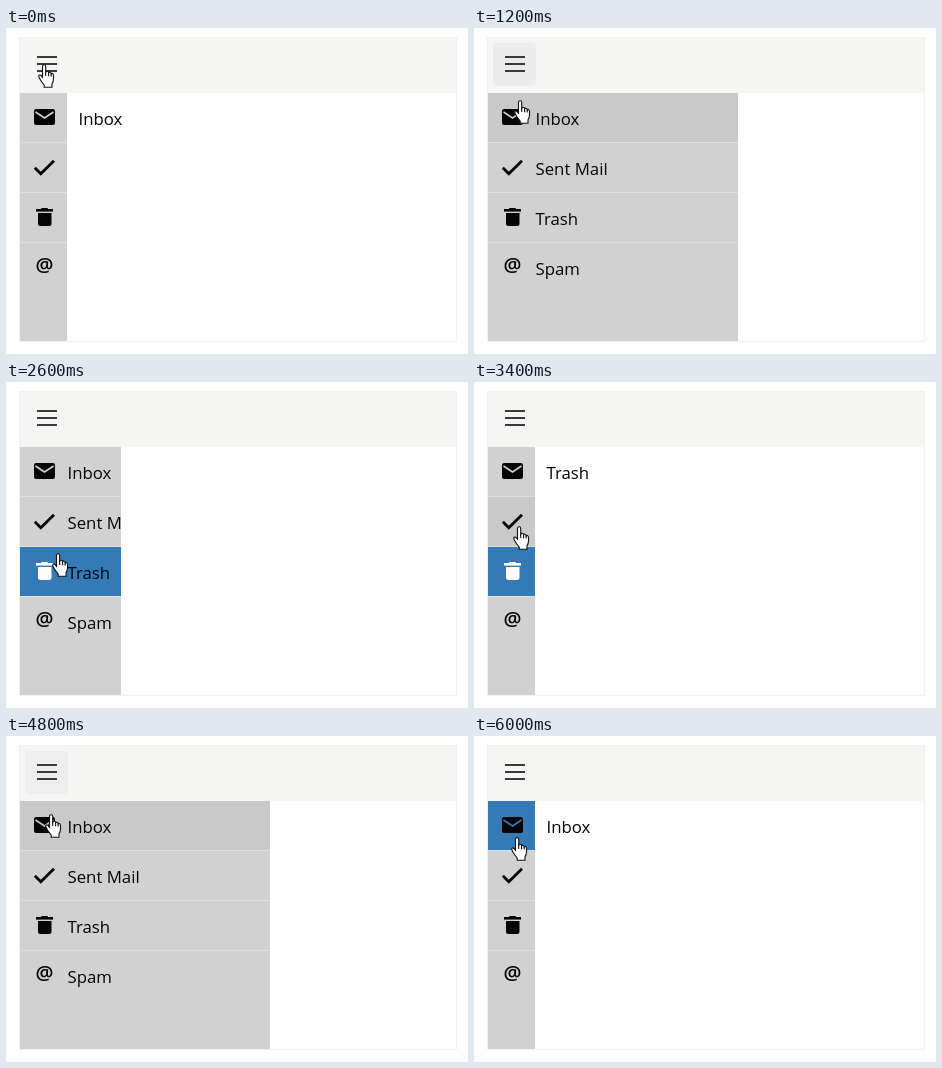
An HTML page with a canvas that plays this animation: 462x326 px, repeating every 6.4 s.

```html
<!DOCTYPE html>
<html lang="en">
<head>
<meta charset="utf-8">
<title>Sidebar menu</title>
<style>
html, body { margin: 0; width: 100%; height: 100%; overflow: hidden; background: #fefefe; }
canvas { display: block; }
</style>
</head>
<body>
<canvas id="stage" width="462" height="326"></canvas>
<script>
const ctx = document.getElementById('stage').getContext('2d');
const LOOP = 6400, STEP = 200, SLIDE = 500;
const LEFT = 14, TOP = 65, BOTTOM = 313, ROW = 50;
const NARROW = 47, WIDE = 250;
const BLUE = '#337ab7', GREY = '#d1d1d2', HOVER = '#c9c9ca', BLACK = '#050505';
const LABELS = ['Inbox', 'Sent Mail', 'Trash', 'Spam'];

// Sidebar slides: start time and whether it opens
const slides = [[215, true], [2380, false], [3885, true], [5380, false]];

// Cursor stops: time, left, top, hovered row (-1 for none)
const stops = [
  [0, 32, 36, -1],
  [1200, 40, 72, 0], [1400, 43, 121, 1], [1600, 45, 184, 2], [1800, 46, 222, 3], [2000, 46, 171, 2],
  [3400, 39, 144, 1], [3600, 40, 92, 0], [3800, 41, 28, -1],
  [4600, 40, 58, -1], [4800, 39, 78, 0], [5000, 38, 95, 0], [5200, 37, 101, 0]
];

const last = (list, t) => list.filter(item => item[0] <= t).pop();

// Same curve as the CSS "ease" keyword
function ease(x) {
  if (x <= 0) return 0;
  if (x >= 1) return 1;
  const bez = (a, b, s) => 3 * a * s * (1 - s) ** 2 + 3 * b * s * s * (1 - s) + s ** 3;
  let lo = 0, hi = 1;
  for (let i = 0; i < 24; i++) {
    const mid = (lo + hi) / 2;
    if (bez(0.25, 0.25, mid) < x) lo = mid; else hi = mid;
  }
  return bez(0.1, 1, lo);
}

function sidebarWidth(t) {
  const slide = last(slides, t);
  if (!slide) return NARROW;
  const p = ease((t - slide[0]) / SLIDE);
  return Math.round(NARROW + (WIDE - NARROW) * (slide[1] ? p : 1 - p));
}

function rect(x, y, w, h, color) {
  ctx.fillStyle = color;
  ctx.fillRect(x, y, w, h);
}

function round(x, y, w, h, r, color) {
  ctx.fillStyle = color;
  ctx.beginPath();
  ctx.roundRect(x, y, w, h, r);
  ctx.fill();
}

function line(points, width, color) {
  ctx.strokeStyle = color;
  ctx.lineWidth = width;
  ctx.beginPath();
  points.forEach(([x, y]) => ctx.lineTo(x, y));
  ctx.stroke();
}

function text(str, x, y, font = '16.8px') {
  ctx.font = font + ' "Open Sans", "Noto Sans", sans-serif';
  ctx.fillText(str, x, y);
}

const icons = [
  (color, back) => {
    round(28, 81, 21, 16, 2.2, color);
    line([[29.5, 84], [38.5, 90], [47.5, 84]], 1.6, back);
  },
  color => line([[28.8, 139.8], [34.8, 145.8], [48, 132.8]], 2.8, color),
  color => {
    round(35, 180, 7, 3, 1, color);
    rect(30, 181, 17, 2.6, color);
    round(32, 185, 13.5, 13, [0, 0, 2.5, 2.5], color);
  },
  color => {
    ctx.fillStyle = color;
    ctx.textAlign = 'center';
    text('@', 38.5, 244, '600 20px');
    ctx.textAlign = 'left';
  }
];

const hand = new Path2D('M4.5 2.5Q4.5.7 6.1.7Q7.7.7 7.7 2.5V8Q8 7.2 9.1 7.2Q10.5 7.2 10.6 8.7' +
  'Q11 7.9 12 8.2Q13.1 8.5 13.2 9.8Q13.6 9.2 14.4 9.5Q15.5 10 15.5 11.5V15Q15.5 17.5 14 19.7' +
  'V23.3H6.2V21Q4 18.5 2.5 16Q.8 13.5.7 12Q1 10.4 2.8 11.3L4.5 13.2Z');
const knuckles = new Path2D('M7.7 8V12M10.6 8.7V12.2M13.2 9.8V12.6');

function drawCursor(x, y) {
  ctx.save();
  ctx.translate(x, y);
  ctx.fillStyle = '#fff';
  ctx.strokeStyle = '#111';
  ctx.lineWidth = 1.1;
  ctx.fill(hand);
  ctx.stroke(hand);
  ctx.stroke(knuckles);
  ctx.restore();
}

function drawHeader(t) {
  rect(LEFT, 10, 436, 55, '#f5f5f4');
  if (t >= 200 && t < 2400) round(19, 15, 43, 43, 4, '#ebebec');
  if (t >= 3800 && t < 5400) round(19, 15, 43, 43, 4, '#eeeeee');
  for (const y of [28, 35, 42]) rect(31, y, 20, 2, '#3a3a3d');
}

function drawSidebar(width, hover, active, whiteIcon) {
  ctx.save();
  ctx.beginPath();
  ctx.rect(LEFT, TOP, width, BOTTOM - TOP);
  ctx.clip();
  rect(LEFT, TOP, width, BOTTOM - TOP, GREY);
  LABELS.forEach((label, i) => {
    const y = TOP + i * ROW;
    const back = i === active ? BLUE : i === hover ? HOVER : GREY;
    rect(LEFT, y, width, ROW - 1, back);
    if (i < 3) rect(LEFT, y + ROW - 1, width, 1, '#dfdfe0');
    icons[i](i === active && whiteIcon ? '#fff' : BLACK, back);
    ctx.fillStyle = BLACK;
    text(label, 61.5, y + 32);
  });
  ctx.restore();
}

function draw(t) {
  const [, x, y, hover] = last(stops, t);
  const trash = t >= 2400 && t < 5400;
  const active = t >= 5400 ? 0 : t >= 2400 && t < 4000 ? 2 : -1;

  rect(0, 0, 462, 326, '#fefefe');
  ctx.strokeStyle = '#f2f2f1';
  ctx.lineWidth = 1;
  ctx.strokeRect(13.5, 9.5, 437, 304);
  drawHeader(t);
  ctx.fillStyle = BLACK;
  text(trash ? 'Trash' : 'Inbox', 72.5, 97);
  drawSidebar(sidebarWidth(t), hover, active, t < 6000);
  drawCursor(x, y);
}

const start = performance.now();
function tick() {
  const t = (performance.now() - start) % LOOP;
  draw(Math.floor(t / STEP) * STEP);
  requestAnimationFrame(tick);
}
tick();
</script>
</body>
</html>
```
